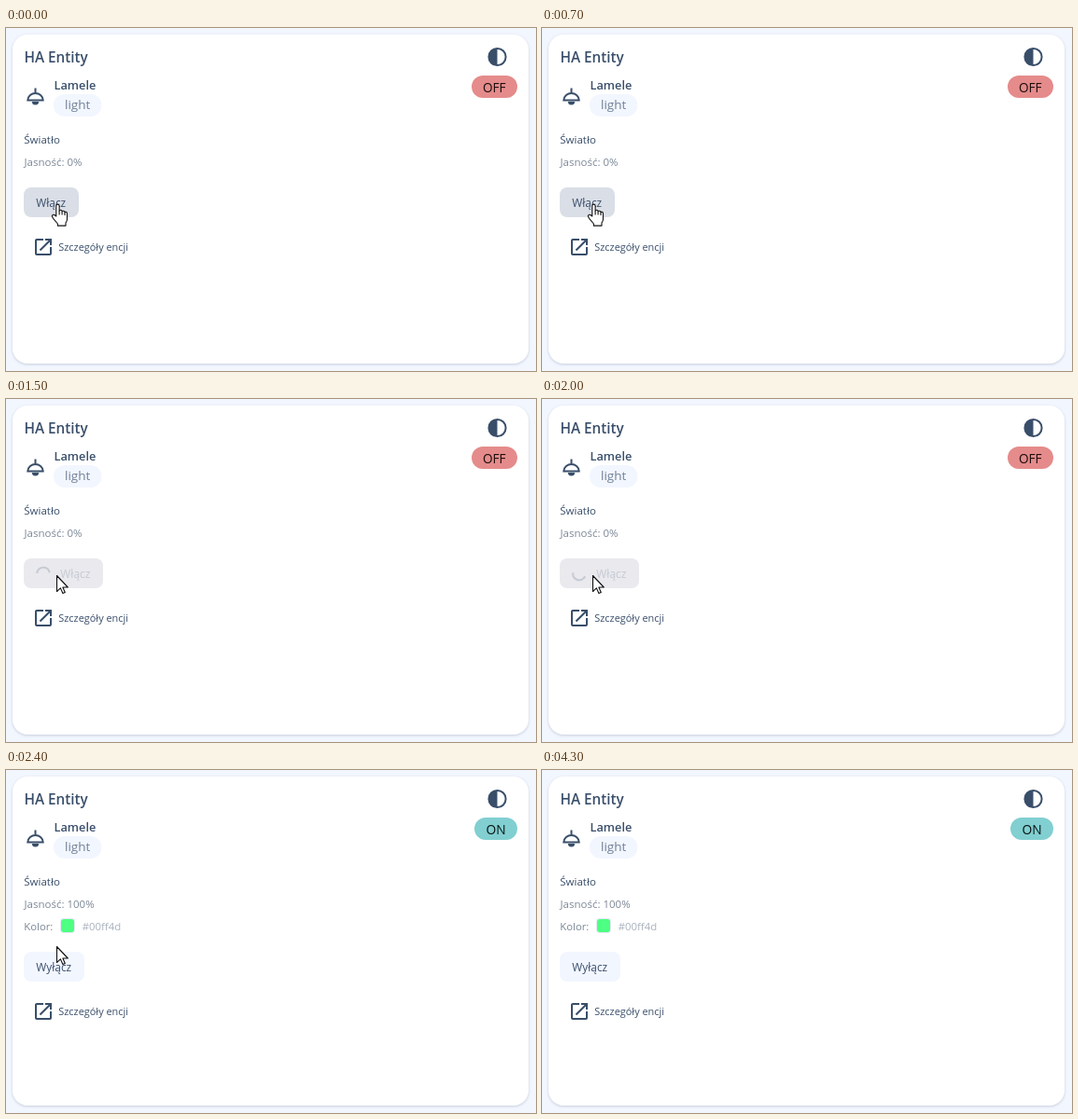
An HTML page with a canvas that plays this animation: 568x368 px, repeating every 4500 ms.

```html
<!DOCTYPE html>
<html lang="pl">
<head>
<meta charset="utf-8">
<title>HA Entity</title>
<style>
html, body { margin: 0; width: 100%; height: 100%; overflow: hidden; background: #f2f6ff; }
canvas { display: block; width: 568px; height: 368px; }
</style>
</head>
<body>
<canvas id="stage"></canvas>
<script>
const W = 568, H = 368, LOOP = 4500;
const INK = '#394e6a', SOFT = '#7b8797', FAINT = '#aab2be', TONAL = '#f2f6ff';
const canvas = document.getElementById('stage');
const ctx = canvas.getContext('2d');
const ratio = window.devicePixelRatio || 1;
canvas.width = W * ratio;
canvas.height = H * ratio;

const openIcon = new Path2D('M14 3V5H17.59L7.76 14.83L9.17 16.24L19 6.41V10H21V3ZM19 19H5V5H12V3H5C3.89 3 3 3.9 3 5V19A2 2 0 0 0 5 21H19A2 2 0 0 0 21 19V12H19Z');
const arrow = new Path2D('M0 0V17L3.9 13.4L6.4 19L8.8 18L6.4 12.5H11.8Z');
const hand = new Path2D('M5 13.5V2.2Q5 .6 6.6 .6T8.3 2.2V7.8Q8.3 6.8 9.8 6.8T11.3 8.4Q11.5 7.6 12.8 7.7T14.2 9.4Q14.4 8.7 15.5 8.9T16.7 10.6V16.5Q16.7 18.6 15.2 20.6V23.6H6.6V21.5L2.4 16.6Q.2 13.9 .7 12.7Q1.6 11 3.5 12.3Z');
const handLines = new Path2D('M8.3 7.8V12M11.3 8.4V12M14.2 9.4V12.4');

function text(str, x, y, size, color, weight = 400) {
  ctx.font = `${weight} ${size}px "Open Sans", "Noto Sans", sans-serif`;
  ctx.fillStyle = color;
  ctx.fillText(str, x, y);
}

function box(x, y, w, h, r, color) {
  ctx.beginPath();
  ctx.roundRect(x, y, w, h, r);
  ctx.fillStyle = color;
  ctx.fill();
}

function at(x, y, draw) {
  ctx.save();
  ctx.translate(x, y);
  draw();
  ctx.restore();
}

function card() {
  ctx.fillStyle = '#f2f6ff';
  ctx.fillRect(0, 0, W, H);
  ctx.save();
  ctx.shadowColor = 'rgba(30,45,75,.2)';
  ctx.shadowBlur = 3 * ratio;
  ctx.shadowOffsetY = ratio;
  box(7, 7, 553, 353, 16, '#fff');
  ctx.restore();
}

function contrastIcon() {
  ctx.strokeStyle = ctx.fillStyle = INK;
  ctx.lineWidth = 2;
  ctx.beginPath();
  ctx.arc(526.5, 31, 9.1, 0, Math.PI * 2);
  ctx.stroke();
  ctx.beginPath();
  ctx.arc(526.5, 31, 9.1, Math.PI / 2, Math.PI * 1.5);
  ctx.fill();
}

function lampIcon() {
  ctx.strokeStyle = ctx.fillStyle = INK;
  ctx.lineWidth = 2;
  ctx.beginPath();
  ctx.moveTo(31.5, 64.5);
  ctx.lineTo(31.5, 70);
  ctx.moveTo(23.3, 77.6);
  ctx.bezierCurveTo(23.6, 67.6, 39.4, 67.6, 39.7, 77.6);
  ctx.closePath();
  ctx.stroke();
  ctx.beginPath();
  ctx.arc(31.5, 79, 3.6, 0, Math.PI);
  ctx.fill();
}

function header(on) {
  text('HA Entity', 19.5, 37, 15.3, INK, 600);
  contrastIcon();
  lampIcon();
  text('Lamele', 51.5, 66, 12.8, INK, 600);
  box(51, 71, 51.5, 24, 12, TONAL);
  text('light', 63, 87, 13.5, '#718096');
  if (on) {
    box(502, 51, 46, 24, 12, '#81cfd1');
    text('ON', 514.4, 69, 13.8, '#0a1414');
  } else {
    box(499, 51, 49, 24, 12, '#e58b8b');
    text('OFF', 511, 69, 13.6, '#1c0c0c');
  }
}

function details(on) {
  text('Światło', 19.3, 124, 11.5, INK);
  text('Jasność: ' + (on ? '100%' : '0%'), 19.5, 148, 11.5, SOFT);
  if (on) {
    text('Kolor:', 19.3, 172, 11.3, SOFT);
    box(58, 159, 16, 16, 4, '#e3e9f4');
    box(59, 160, 14, 14, 3, '#4dff82');
    text('#00ff4d', 81.7, 172, 11.4, FAINT);
  }
  at(28, on ? 247 : 223, () => {
    ctx.fillStyle = INK;
    ctx.fill(openIcon);
    text('Szczegóły encji', 28.3, 16, 10.9, INK, 500);
  });
}

function spinner(t) {
  const start = (184 + 0.4 * (t - 1500)) * Math.PI / 180;
  ctx.beginPath();
  ctx.arc(40, 187.5, 6.8, start, start + 165 * Math.PI / 180);
  ctx.strokeStyle = '#c6cad3';
  ctx.lineWidth = 2;
  ctx.stroke();
}

function button(t, on) {
  if (on) {
    box(19, 195, 65, 32, 8, TONAL);
    text('Wyłącz', 32.2, 216, 11.9, INK, 500);
  } else if (t >= 1500) {
    box(19, 171, 85, 32, 8, '#e9e9ee');
    spinner(t);
    text('Włącz', 58.3, 192, 11.9, '#c6cad3', 500);
  } else {
    box(19, 171, 59, 32, 8, t < 1300 ? '#dadee6' : '#d6dae3');
    text('Włącz', 32.2, 192, 11.9, INK, 500);
  }
}

function pointer(shape, x, y, lines) {
  at(x, y, () => {
    ctx.fillStyle = '#fff';
    ctx.strokeStyle = '#111';
    ctx.lineWidth = 1.1;
    ctx.lineJoin = 'round';
    ctx.fill(shape);
    ctx.stroke(shape);
    if (lines) ctx.stroke(lines);
  });
}

function cursor(t) {
  if (t < 1500) pointer(hand, 48.8, 188.5, handLines);
  else if (t < 3000) pointer(arrow, 54.5, 189.5);
  else if (t < 3400) pointer(arrow, 56.5, 186.5);
}

function render(time) {
  const t = Math.floor(time % LOOP / 100) * 100;
  const on = t >= 2100;
  ctx.setTransform(ratio, 0, 0, ratio, 0, 0);
  card();
  header(on);
  details(on);
  button(t, on);
  cursor(t);
}

let begin;
function tick(now) {
  begin ??= now;
  render(now - begin);
  requestAnimationFrame(tick);
}
render(0);
requestAnimationFrame(tick);
</script>
</body>
</html>
```
